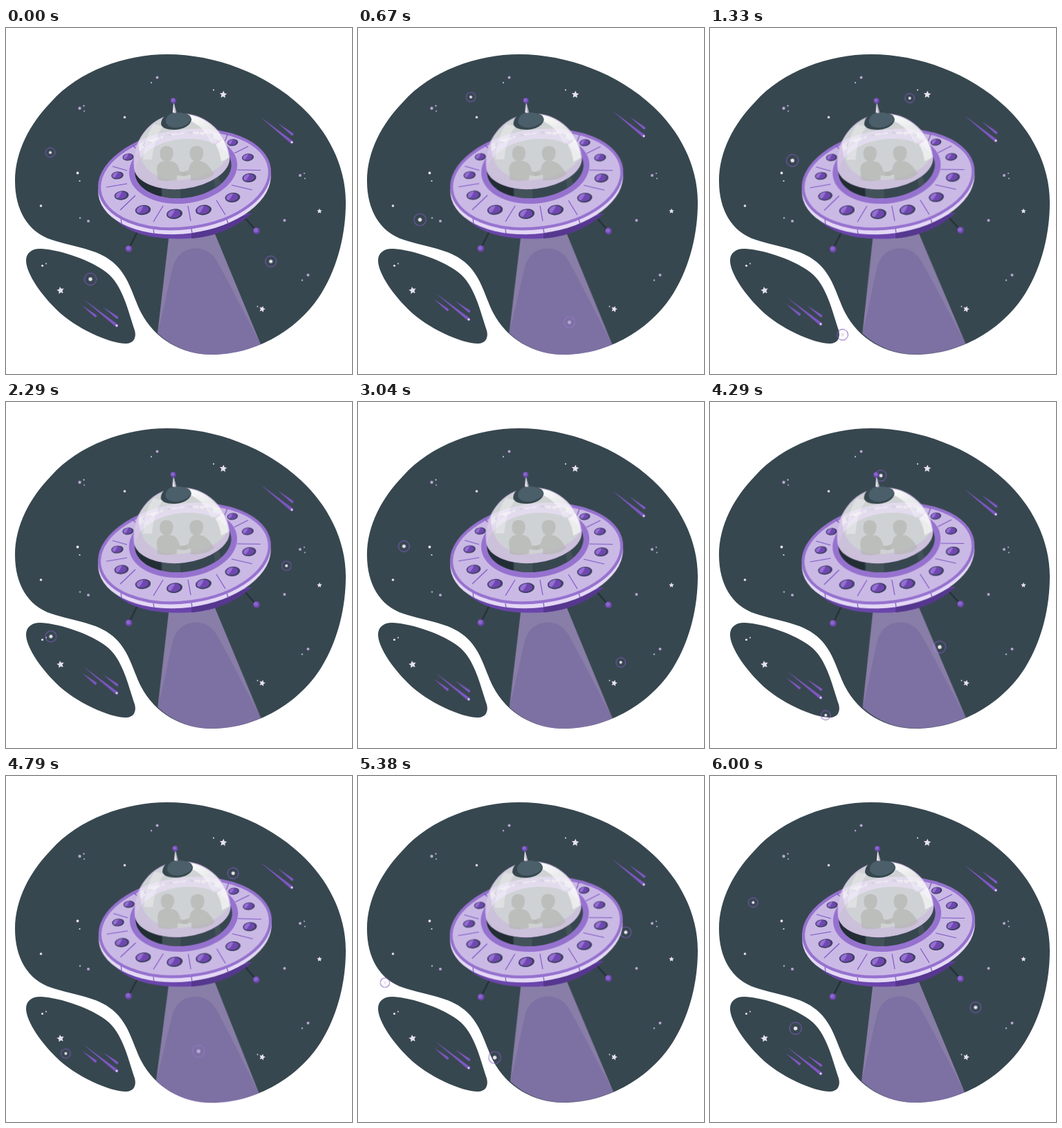
An HTML page without scripts that plays this animation: 500x500 px, repeating every 6040 ms.

```html
<!DOCTYPE html>
<html lang="en">
<head>
<meta charset="utf-8">
<title>Saucer in space</title>
<style>
  html, body { margin: 0; width: 100%; height: 100%; overflow: hidden; background: #fff; }
  svg { display: block; width: 100vw; height: 100vh; }
  .sky { fill: #37474f; }
  .pale { fill: #e6e0ee; }
  .lilac { fill: #b3a6cf; }
  .violet { fill: #7e57c2; }
  .orbit, .ship, .meteor { animation: 6.04s linear infinite; }
  .orbit { animation-name: orbit; transform-origin: 223.5px 275.5px; }
  .orbit circle:nth-child(odd) { fill: none; stroke: #7e57c2; }
  .orbit circle:nth-child(even) { fill: #e9e2f1; }
  .ship { animation-name: rock; transform-origin: 258px 286px; }
  .meteor { animation-name: bob; }
  .seams { fill: none; stroke: #7e57c2; stroke-width: 1.2; }

  @keyframes orbit {
    0% { transform: rotate(.4deg); }
    99.338% { transform: rotate(359.4deg); }
    100% { transform: rotate(360.4deg); }
  }
  /* four 1.5 s swings, then a 40 ms rest */
  @keyframes rock {
    0%, 99.338%, 100% { transform: rotate(0deg); }
    6.209%, 31.043%, 55.877%, 80.712% { transform: rotate(1deg); }
    18.626%, 43.46%, 68.295%, 93.129% { transform: rotate(-1deg); }
  }
  @keyframes bob {
    0%, 24.834%, 49.669%, 74.503%, 99.338%, 100% { transform: translateY(0); }
    12.417%, 37.252%, 62.086%, 86.921% { transform: translateY(-10px); }
  }
</style>
</head>
<body>
<svg viewBox="0 0 500 500">
  <defs>
    <path id="star" d="M0-5.2 1.6-1.9 5.2-1.5 2.6 1.1 3.2 4.8 0 3-3.2 4.8-2.6 1.1-5.2-1.5-1.6-1.9Z"/>
    <g id="port">
      <ellipse rx="11.6" ry="7.3" fill="#3d4160"/>
      <ellipse cx="-.9" cy="-.5" rx="9.4" ry="5.9" fill="#7047b0"/>
      <path d="M-9.4 0C-8.8-4.5-3-6.8 1.2-5.9-1-1.5-4 2.3-7 3.6-8.6 2.8-9.5 1.6-9.4 0Z" fill="#9470d0"/>
    </g>
    <g id="ball">
      <circle r="4.8" fill="#6b46ae"/>
      <circle cx="-.8" cy="-.9" r="3.2" fill="#8a64cb"/>
    </g>
    <path id="dome" d="M185.500 202.500A69 71 -7 0 1 322.500 186A69 38 -7 0 1 185.500 202.500Z"/>
    <linearGradient id="shine" x1="0" y1="0" x2=".6" y2="1">
      <stop offset="0" stop-color="#fff" stop-opacity=".95"/>
      <stop offset="1" stop-color="#fff" stop-opacity=".2"/>
    </linearGradient>
    <clipPath id="inDome"><use href="#dome"/></clipPath>
    <clipPath id="inPit"><ellipse cx="256" cy="203" rx="70" ry="42.500" transform="rotate(-7 256 203)"/></clipPath>
  </defs>

  <g class="sky">
    <path d="M233 38C172 38 105 62 65 107C35 138 13 178 13 221C13 262 31 295 66 306C100 317 131 319 154 338C177 357 182 384 195 411C215 450 255 472 297 472C362 472 424 435 456 383C480 344 491 296 491 252C491 198 464 148 426 113C376 66 302 38 233 38Z"/>
    <path d="M29 336C29 324 39 318 51 319C81 321 123 336 145 353C168 370 177 410 186 437C189 448 184 456 173 456C150 456 100 434 72 406C46 380 29 352 29 336Z"/>
  </g>

  <g class="lilac">
    <circle cx="218.500" cy="71.500" r="2"/><circle cx="210" cy="79" r="1.2"/>
    <circle cx="106.500" cy="116" r="2.2"/><circle cx="112.500" cy="112.500" r="1.2"/><circle cx="113" cy="120" r="1.1"/>
    <circle cx="107" cy="274.500" r="1.2"/><circle cx="119" cy="279" r="2"/>
    <circle cx="425" cy="213" r="2"/><circle cx="431" cy="210" r="1.1"/><circle cx="432" cy="217.500" r="1.1"/>
    <circle cx="402.500" cy="278" r="2"/><circle cx="436.500" cy="357" r="2"/><circle cx="428" cy="364.500" r="1.2"/>
  </g>
  <g class="pale">
    <circle cx="171.500" cy="129" r="1.8"/><circle cx="103.500" cy="209.500" r="1.9"/><circle cx="106.500" cy="221" r="1.1"/>
    <circle cx="50.500" cy="257" r="1.8"/><circle cx="300" cy="89.500" r="1.1"/><circle cx="363.500" cy="402.500" r=".9"/>
    <circle cx="52.500" cy="343.500" r="1.6"/><circle cx="58" cy="340.500" r="1"/>
    <use href="#star" transform="translate(314 96) rotate(5)"/>
    <use href="#star" transform="translate(453 264.500) scale(.7)"/>
    <use href="#star" transform="translate(370.300 406) rotate(15) scale(.85)"/>
    <use href="#star" transform="translate(78.700 379) rotate(-10)"/>
  </g>

  <g class="meteor">
    <path class="violet" d="M367.500 128.500 411.600 166.700A2.200 2.200 0 0 0 414.500 163.300ZM393 137.500 412.400 155A1.800 1.800 0 0 0 414.700 152.100Z"/>
    <circle class="pale" cx="413" cy="165" r="1.5"/>
    <path class="violet" d="M112 392 158.600 431.700A2.200 2.200 0 0 0 161.500 428.300ZM110 401 128.100 417.400A1.800 1.800 0 0 0 130.400 414.400ZM140.500 403.500 159.300 419.800A1.800 1.800 0 0 0 161.500 416.800Z"/>
    <circle class="pale" cx="160" cy="430" r="1.5"/>
  </g>

  <g class="orbit">
    <circle cx="63.300" cy="181.200" r="6.800"/><circle cx="63.300" cy="181.200" r="2"/>
    <circle cx="122.700" cy="363.700" r="8.700"/><circle cx="122.700" cy="363.700" r="2.700"/>
    <circle cx="383.200" cy="336" r="7.900"/><circle cx="383.200" cy="336" r="2.500"/>
  </g>

  <g class="ship">
    <path fill="#d9b3ff" fill-opacity=".5" d="M236 296 219 441C238 459 265 472 297 472C322 472 345 467 368 457L298 288Z"/>
    <path fill="#635594" fill-opacity=".3" d="M219 441C228 407 235 370 241 346C246 327 259 318.500 274 318.500C289 318.500 299 326 306 339C322 368 348 418 368 457C345 467 322 472 297 472C265 472 238 459 219 441Z"/>

    <path d="M190 294 179 316M344 273 360 291" stroke="#263238" stroke-width="2.600"/>
    <use href="#ball" x="177.500" y="319"/>
    <use href="#ball" x="362" y="293"/>

    <!-- hull -->
    <path fill="#6a45ab" d="M160 279C185 300 218 305.500 258 304.500C300 302.500 333 288 355 268Z"/>
    <path fill="#56378f" d="M268 304.200C303 301.500 333 288 355 268L268 292Z"/>
    <ellipse cx="258" cy="225" rx="125.500" ry="72" transform="rotate(-7.500 258 225)" fill="#e4d8f5"/>
    <path class="seams" d="M166 275 167 283M213 291 214 297.500M268 290 269 297M319 276 321 283"/>
    <ellipse cx="258" cy="219" rx="123.700" ry="70" transform="rotate(-7.500 258 219)" fill="#cab9e5" stroke="#9672cf" stroke-width="4.200"/>

    <path class="seams" d="M154 200 175 206M145 230 175 225M165 263 187 242M213 280 227 257M263 257 267 279M304 249 317 270M326 227 356 234M334 205 368 205.500M330 181 350 171M314 170 320 154M183 169 194 181M220 153 224 163M249 148 250 158M280 147 279 158"/>
    <use href="#port" transform="translate(176.500 186.500) rotate(-7) scale(.7)"/>
    <use href="#port" transform="translate(161 213) rotate(-7) scale(.76)"/>
    <use href="#port" transform="translate(167 242) rotate(-7) scale(.9)"/>
    <use href="#port" transform="translate(198 263) rotate(-7) scale(.97)"/>
    <use href="#port" transform="translate(243.500 268.700) rotate(-7)"/>
    <use href="#port" transform="translate(285.500 263) rotate(-7)"/>
    <use href="#port" transform="translate(327.500 245) rotate(-7) scale(.95)"/>
    <use href="#port" transform="translate(351.500 216.500) rotate(-7) scale(.88)"/>
    <use href="#port" transform="translate(349.500 187) rotate(-7) scale(.75)"/>
    <use href="#port" transform="translate(327.500 165.500) rotate(-7) scale(.68)"/>
    <use href="#port" transform="translate(205 168) rotate(-7) scale(.62)"/>
    <use href="#port" transform="translate(234 157.500) rotate(-7) scale(.56)"/>
    <use href="#port" transform="translate(264 153.500) rotate(-7) scale(.56)"/>
    <use href="#port" transform="translate(293 156) rotate(-7) scale(.62)"/>

    <!-- cockpit -->
    <ellipse cx="256" cy="203.500" rx="78.500" ry="50" transform="rotate(-7 256 203.500)" fill="#9672cf"/>
    <g clip-path="url(#inPit)">
      <path class="sky" d="M180 150H335V255H180Z"/>
      <path fill="#222e34" d="M180 205 224 226 225 250 200 245 184 220Z"/>
      <path fill="#435259" d="M299 212 306 208 313 236 304 240ZM226 228 252 228 252 250 226 250Z"/>
    </g>

    <!-- glass dome with two riders -->
    <use href="#dome" fill="#f6f5f6" fill-opacity=".8"/>
    <g clip-path="url(#inDome)">
      <path fill="#cbb6e2" fill-opacity=".6" d="M192 163C190 200 212 220.500 250 219.500C285 217 312 205 323 183V236H180V163Z"/>
      <g fill="#b6b7b4" fill-opacity=".75">
        <path d="M223 186C221 177 224 170.500 232 170.500C240 170.500 243.500 177 241 185C240 189 238 191 236 192C246 193 249 198 251 207L262 209 261 214 247 213V219C238 222 227 222 219 219L218 204C218 197 222 193 229 192C226 191 224 189 223 186Z"/>
        <path d="M266 185C264 177 267 170.500 275.500 170.500C284 170.500 287 177 284.500 185C283.500 189 281 191 279 192C289 193 294 200 301 211L294 216C285 220 275 221 267 220V212L254 214 253 209 264 205C265 198 267 194 272 192C269 191 267 189 266 185Z"/>
      </g>
      <path fill="url(#shine)" d="M266 125C286 128 304 140 315 158L297 168C291 152 281 141 268 135Z"/>
      <path fill="#fff" fill-opacity=".6" d="M315 160C320 169 322 178 323 187L311 193C310 184 307 175 303 169Z"/>
      <path fill="#fff" fill-opacity=".3" d="M213 139 227 142C217 155 213 171 211 190L198 190C200 170 204 153 213 139Z"/>
    </g>
    <use href="#dome" fill="none" stroke="#cdbbe3" stroke-width="1.200"/>

    <path fill="#37474f" d="M224 139C224 129 233 121.500 246 121.500C258 121.500 267 125 268 132C267 141 256 147 242 147C232 147 225 144 224 139Z"/>
    <path fill="#4b5f6a" d="M231 136C230 128 237 122 247 122C258 122 266 126 267 132C265 139 256 143 246 144C238 144 232 141 231 136Z"/>
    <path fill="#eeeaf2" d="M242.200 107 240.800 122Q243.500 123.500 246.200 122Z"/>
    <path fill="#b9b2c3" d="M242.200 107 243.800 122.700 246.200 122Z"/>
    <use href="#ball" transform="translate(242 105) scale(.83)"/>
  </g>
</svg>
</body>
</html>
```
